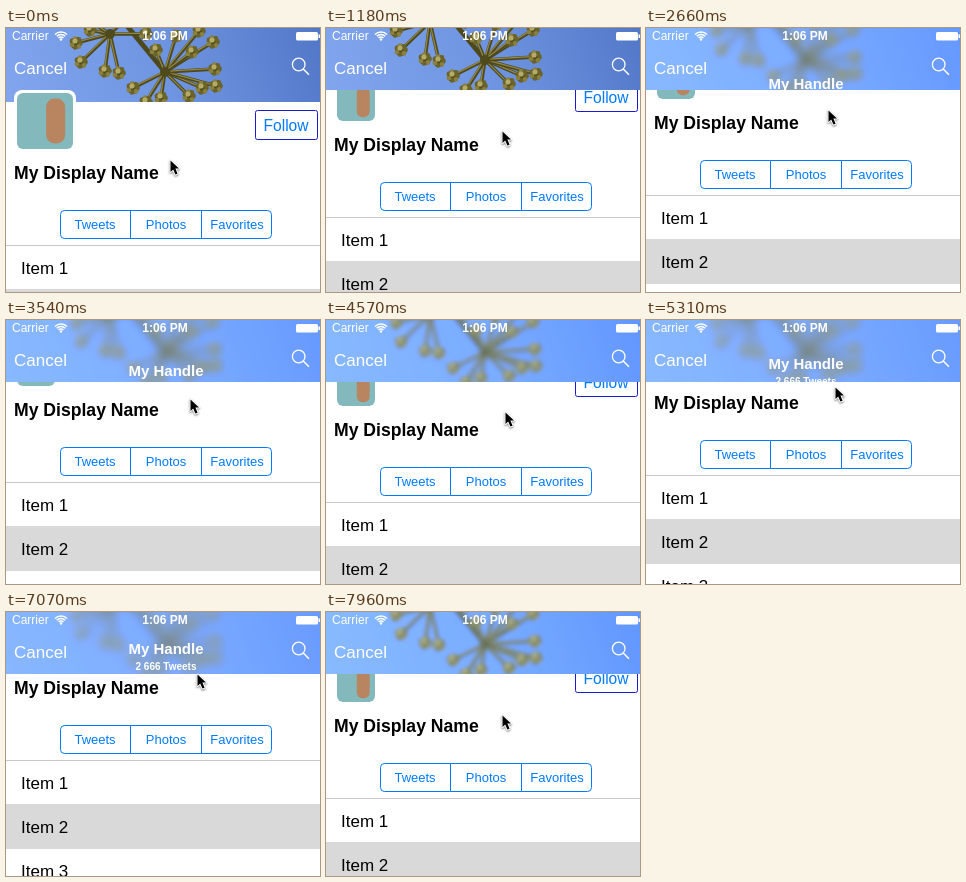
Animation, 314 px wide and 264 px high, one loop 8000 ms. Source, as an HTML page with a canvas:

```html
<!DOCTYPE html>
<html lang="en">
<head>
<meta charset="utf-8">
<title>Profile scroll</title>
<style>
  html, body { margin: 0; width: 100%; height: 100%; overflow: hidden; background: #fff; }
  canvas { display: block; }
</style>
</head>
<body>
<canvas id="stage" width="314" height="264"></canvas>
<script>
const W = 314, H = 264, LOOP = 8000, TICK = 147.4;
const BAR = 62, HEADER = 74, BLUE = '#007aff';
const ctx = document.getElementById('stage').getContext('2d');

// time, scroll offset, pointer x, pointer y
const KEYS = [
  [0, 0, 164, 131], [140, 3, 165, 128], [1180, 28, 176, 102], [1910, 42, 179, 88],
  [2500, 49, 182, 82], [3240, 56, 184, 77], [3400, 56, 184, 77], [3537, 55, 184, 78],
  [4270, 36, 179, 90], [4430, 36, 179, 90], [4569, 35, 179, 91], [5450, 67, 191, 61],
  [5760, 67, 191, 61], [6190, 84, 198, 45], [6500, 88, 199, 41], [6920, 76, 194, 54],
  [7959, 31, 176, 102], [LOOP, 31, 176, 102]
];

function poseAt(time) {
  const t = Math.floor((time + 9) / TICK) * TICK;
  const next = KEYS.findIndex(key => key[0] > t);
  const a = KEYS[next - 1], b = KEYS[next];
  const k = (t - a[0]) / (b[0] - a[0]);
  return a.slice(1).map((v, i) => Math.round(v + (b[i + 1] - v) * k));
}

function text(str, x, y, size, color, { bold = false, align = 'left' } = {}) {
  ctx.font = `${bold ? 'bold ' : ''}${size}px "Liberation Sans", Arial, sans-serif`;
  ctx.textAlign = align;
  ctx.fillStyle = color;
  ctx.fillText(str, x, y);
}

function roundBox(x, y, w, h, r, fill, stroke) {
  ctx.beginPath();
  ctx.roundRect(x, y, w, h, r);
  if (fill) { ctx.fillStyle = fill; ctx.fill(); }
  if (stroke) { ctx.strokeStyle = stroke; ctx.lineWidth = 1; ctx.stroke(); }
}

function line(c, x1, y1, x2, y2, color, width = 1) {
  c.strokeStyle = color;
  c.lineWidth = width;
  c.beginPath();
  c.moveTo(x1, y1);
  c.lineTo(x2, y2);
  c.stroke();
}

function disc(c, x, y, r, color) {
  c.fillStyle = color;
  c.beginPath();
  c.arc(x, y, r, 0, 7);
  c.fill();
}

// Sky and flower heads, painted once with a margin so that blurring keeps clean edges.
const MARGIN = 30;
const photo = document.createElement('canvas');
photo.width = W + 2 * MARGIN;
photo.height = HEADER + 2 * MARGIN;

function bud(c, x, y) {
  disc(c, x, y, 6, '#4f4a1c');
  for (let i = 0; i < 7; i++) {
    const px = x + 4.5 * Math.cos(i * 0.9), py = y + 4.5 * Math.sin(i * 0.9);
    disc(c, px, py, 2.4, i % 2 ? '#8a8040' : '#6b6429');
  }
  disc(c, x - 1, y - 2, 2.6, '#b5aa66');
}

function flower(c, x, y, buds) {
  for (const [bx, by] of buds) {
    line(c, x, y, bx, by, '#4d491d', 3.4);
    line(c, x - 0.6, y - 0.6, bx - 0.6, by - 0.6, '#948745', 1.3);
  }
  for (const [bx, by] of buds) bud(c, bx, by);
  disc(c, x, y, 5, '#4f4a1c');
}

function paintPhoto() {
  const c = photo.getContext('2d');
  const sky = c.createLinearGradient(0, photo.height, photo.width, 0);
  sky.addColorStop(0, '#86a9f0');
  sky.addColorStop(0.5, '#6f95e2');
  sky.addColorStop(1, '#4a70c0');
  c.fillStyle = sky;
  c.fillRect(0, 0, photo.width, photo.height);
  c.translate(MARGIN, MARGIN);
  line(c, 159, 44, 98, -30, '#4d491d', 5);
  flower(c, 104, 6, [[70, 15], [75, 34], [99, 43], [113, 45], [84, 2], [140, 6], [76, -12], [125, -14]]);
  flower(c, 159, 44, [
    [127, 60], [155, 70], [183, 68], [196, 60], [210, 58], [209, 41],
    [207, 14], [193, 3], [170, 8], [150, 22], [140, 74], [186, 24]
  ]);
}

function drawAvatar(s) {
  const size = 56 - 18 * Math.min(1, s / 16), top = 121 - s - size;
  roundBox(8, top - 3, size + 6, size + 6, 8, '#fff');
  roundBox(11, top, size, size, 6, '#83b9bd');
  roundBox(11 + size * 0.52, top + size * 0.1, size * 0.34, size * 0.8, size * 0.15, '#b98561');
}

function drawContent(s) {
  ctx.save();
  ctx.translate(0, -s);
  roundBox(249.5, 82.5, 62, 29, 2, '#fff', '#1a1ad6');
  text('Follow', 280, 102.5, 15.6, BLUE, { align: 'center' });
  text('My Display Name', 8, 151, 17.6, '#000', { bold: true });

  roundBox(54.5, 182.5, 211, 28, 4, '#fff', BLUE);
  ['Tweets', 'Photos', 'Favorites'].forEach((label, i) => {
    if (i) line(ctx, 53.5 + 71 * i, 182, 53.5 + 71 * i, 211, BLUE);
    text(label, 89 + 71 * i, 201, 13, BLUE, { align: 'center' });
  });

  line(ctx, 0, 217.5, W, 217.5, '#c8c7cc');
  for (let i = 0; i < 4; i++) {
    const y = 218 + 44 * i;
    if (i === 1) {
      ctx.fillStyle = '#d9d9d9';
      ctx.fillRect(0, y - 1, W, 45);
    } else if (i > 1) {
      line(ctx, 15, y + 43.5, W, y + 43.5, '#c8c7cc');
    }
    text(`Item ${i + 1}`, 15, y + 28, 17, '#000');
  }
  ctx.restore();
}

function drawHeader(s) {
  const shift = Math.min(s, HEADER - BAR);
  const blurred = s >= 30;
  ctx.save();
  ctx.beginPath();
  ctx.rect(0, 0, W, HEADER - shift);
  ctx.clip();
  if (blurred) ctx.filter = `blur(${Math.min(6, 2 + (s - 30) * 0.11)}px) saturate(1.3) brightness(1.15)`;
  ctx.drawImage(photo, -MARGIN, -MARGIN - shift);
  ctx.filter = 'none';
  if (blurred) {
    ctx.fillStyle = `rgba(135,175,255,${Math.min(0.5, 0.3 + (s - 30) * 0.004)})`;
    ctx.fillRect(0, 0, W, HEADER);
  }
  const labelY = Math.max(33, 106 - s);
  text('My Handle', 160, labelY + 5, 15, '#fff', { bold: true, align: 'center' });
  text('2 666 Tweets', 160, labelY + 20.5, 10, '#fff', { bold: true, align: 'center' });
  ctx.restore();
}

function drawNavigation() {
  text('Carrier', 6, 12, 12, '#fff');
  text('1:06 PM', 159, 12, 12, '#fff', { bold: true, align: 'center' });
  text('Cancel', 8, 46, 17, '#fff');

  ctx.strokeStyle = '#fff';
  ctx.lineWidth = 1.5;
  for (const r of [3.5, 6, 8.5]) {
    ctx.beginPath();
    ctx.arc(55, 12.5, r, -Math.PI * 0.75, -Math.PI * 0.25);
    ctx.stroke();
  }
  disc(ctx, 55, 11.5, 1.2, '#fff');

  roundBox(290, 4, 22, 8.5, 1.5, '#fff');
  ctx.fillRect(312.5, 6.5, 1.5, 3.5);

  ctx.strokeStyle = '#fff';
  ctx.lineWidth = 1.3;
  ctx.beginPath();
  ctx.arc(292.7, 36.5, 6.3, 0, 7);
  ctx.stroke();
  line(ctx, 297.2, 41, 303, 46.8, '#fff', 1.5);
}

function drawPointer(x, y) {
  const arrow = new Path2D('M0.5 1.5V13L3.2 10.4L5.4 15.6L7.6 14.7L5.4 9.6H9Z');
  ctx.save();
  ctx.translate(x, y);
  ctx.lineJoin = 'round';
  ctx.lineWidth = 2;
  ctx.strokeStyle = '#fff';
  ctx.shadowColor = 'rgba(0,0,0,0.5)';
  ctx.shadowBlur = 2;
  ctx.shadowOffsetY = 1;
  ctx.stroke(arrow);
  ctx.shadowColor = 'transparent';
  ctx.fillStyle = '#000';
  ctx.fill(arrow);
  ctx.restore();
}

function frame() {
  const [s, x, y] = poseAt(performance.now() % LOOP);
  ctx.fillStyle = '#fff';
  ctx.fillRect(0, 0, W, H);
  drawContent(s);
  // The avatar slips behind the header once the bar is pinned.
  const layers = [drawHeader, drawAvatar];
  if (s >= HEADER - BAR) layers.reverse();
  layers.forEach(draw => draw(s));
  drawNavigation();
  drawPointer(x, y);
  requestAnimationFrame(frame);
}

paintPhoto();
frame();
</script>
</body>
</html>
```
